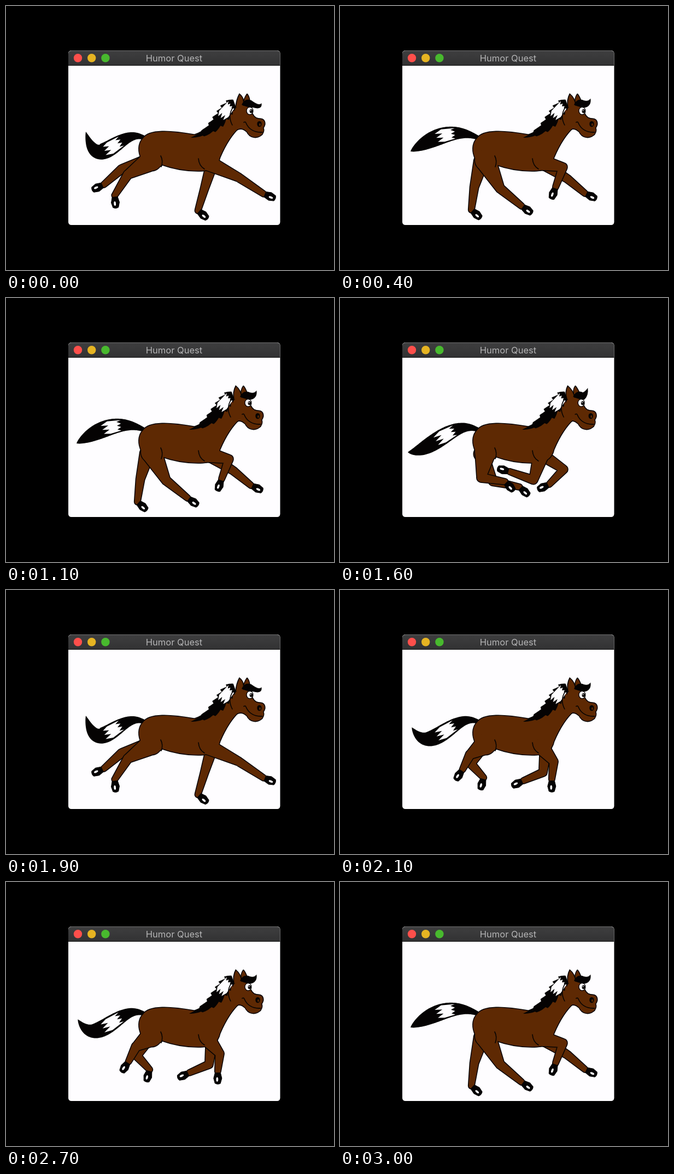
An HTML page with a canvas that plays this animation: 600 px wide and 481 px high, repeating every 3100 ms.

```html
<!DOCTYPE html>
<html lang="en">
<head>
<meta charset="utf-8">
<title>Galloping horse</title>
<style>
  html, body { margin: 0; width: 100%; height: 100%; overflow: hidden; background: #000; }
  canvas { display: block; }
</style>
</head>
<body>
<canvas id="stage" width="600" height="481"></canvas>
<script>
const ctx = document.getElementById('stage').getContext('2d');
const BROWN = '#5e2903', BLACK = '#050303', WHITE = '#fefdff';

// Five key moments of the stride: extend, plant, gather, land, reach.
// Each foot key holds the hoof centre, the hoof angle and the forward bend of the joint.
const hindNear = {
  hip: [266, 281], radii: [19, 8, 5],
  keys: [[200, 358, 85, -11], [170, 335, 162, 4], [311, 344, 46, -32], [343, 372, 35, -11], [275, 379, 40, -19]]
};
const hindFar = {
  hip: [258, 284], radii: [13, 7.5, 5],
  keys: [[167, 331, 155, -10], [220, 355, 137, -20], [338, 353, 42, -24], [250, 380, 42, -3], [185, 347, 160, 1]]
};
const foreNear = {
  hip: [368, 285], radii: [14, 7.5, 5],
  keys: [[483, 347, 22, 4], [432, 380, 38, 3], [298, 313, 195, 34], [390, 342, 110, 30], [445, 348, 60, 22]]
};
const foreFar = {
  hip: [376, 290], radii: [10, 7, 5],
  keys: [[361, 381, 40, 0], [300, 357, 155, 16], [371, 345, 155, 30], [460, 347, 25, 3], [425, 379, 38, 0]]
};
// Tip of the tail and the sag before it.
const tailKeys = [[146, 229, 315], [135, 235, 325], [124, 281, 282], [129, 265, 242], [124, 229, 282]];

const torso = new Path2D('M251 241C262 225 300 227 345 235C375 225 392 195 412 180L426 222C416 230 402 250 391 276C388 290 378 299 360 300C335 301 308 297 286 289C275 300 252 294 246 274C241 260 244 248 251 241Z');
const skull = new Path2D('M410 202C412 186 424 180 433 178L440 176C446 182 446 190 447 196C451 204 456 206 463 206C471 207 472 216 467 222C470 228 466 232 465 234C456 242 443 240 438 229C432 223 426 221 418 226Z');
const creases = new Path2D('M432 212q3 -2 4 1C440 223 450 231 466 230M412 185Q402 200 411 217');

const mix = (a, b, t) => a + (b - a) * t;

// The stride has seven steps; two of them lie between planting and gathering.
function sample(keys, step) {
  const k = step < 1 ? step : step < 4 ? 1 + (step - 1) / 3 : step - 2;
  const i = Math.floor(k), next = keys[(i + 1) % keys.length];
  return keys[i].map((v, n) => mix(v, next[n], k - i));
}

function fill(path, color) { ctx.fillStyle = color; ctx.fill(path); }

function line(path, width = 1.6) {
  ctx.strokeStyle = BLACK;
  ctx.lineWidth = width;
  ctx.stroke(path);
}

function oval(x, y, rx, ry, color) {
  const path = new Path2D();
  path.ellipse(x, y, rx, ry, 0, 0, 7);
  fill(path, color);
  return path;
}

function polygon(points) {
  const path = new Path2D();
  points.forEach(p => path.lineTo(...p));
  path.closePath();
  return path;
}

// Outlines the union of the shapes, leaving no lines inside it.
function flesh(...paths) {
  paths.forEach(p => line(p, 3));
  paths.forEach(p => fill(p, BROWN));
}

function poseLeg({ hip, radii, keys }, step) {
  const [x, y, degrees, bend] = sample(keys, step), angle = degrees * Math.PI / 180;
  const foot = [x - 13 * Math.cos(angle), y - 13 * Math.sin(angle)];
  const dx = foot[0] - hip[0], dy = foot[1] - hip[1], len = Math.hypot(dx, dy);
  const knee = [hip[0] + dx * .53 + dy / len * bend, hip[1] + dy * .53 - dx / len * bend];
  return { shape: limb([hip, knee, foot], radii), x, y, angle };
}

function limb(joints, radii) {
  const path = new Path2D();
  joints.forEach(([x, y], i) => {
    const r = radii[i];
    path.moveTo(x + r, y);
    path.arc(x, y, r, 0, 2 * Math.PI);
    if (i === joints.length - 1) return;
    const [u, v] = joints[i + 1], next = radii[i + 1];
    const len = Math.hypot(u - x, v - y), nx = (v - y) / len, ny = (x - u) / len;
    path.moveTo(x + nx * r, y + ny * r);
    path.lineTo(u + nx * next, v + ny * next);
    path.lineTo(u - nx * next, v - ny * next);
    path.lineTo(x - nx * r, y - ny * r);
    path.closePath();
  });
  return path;
}

function hoof({ x, y, angle }) {
  ctx.save();
  ctx.translate(x, y);
  ctx.rotate(angle);
  const path = new Path2D('M-10 -5L0 -7.5L9 -5Q12 0 9 5L0 7.5L-10 5Z');
  fill(path, BLACK);
  line(path, 1);
  oval(2, 1, 4, 1.9, WHITE);
  ctx.restore();
}

// Hair along a cubic spine, with a jagged white band from t = from to t = to.
function plume([a, b, c, d], width, from, to) {
  const bezier = (t, n) => (1 - t) ** 3 * a[n] + 3 * t * (1 - t) ** 2 * b[n] + 3 * t * t * (1 - t) * c[n] + t ** 3 * d[n];
  const at = (t, side) => {
    const x = bezier(t, 0), y = bezier(t, 1);
    const u = bezier(t + .01, 0) - x, v = bezier(t + .01, 1) - y;
    const w = side * width(t) / Math.hypot(u, v);
    return [x - v * w, y + u * w];
  };
  const top = [], bottom = [], front = [], back = [];
  for (let i = 0; i <= 60; i++) {
    top.push(at(i / 60, 1));
    bottom.unshift(at(i / 60, -1));
  }
  for (let i = 0; i <= 6; i++) {
    const side = .8 - i * .267, spike = i % 2 * .1;
    front.push(at(to - .1 + spike, side));
    back.unshift(at(from + spike * .6, side));
  }
  fill(polygon([...top, ...bottom]), BLACK);
  fill(polygon([...front, ...back]), WHITE);
}

function drawTail(step) {
  const [x, y, sag] = sample(tailKeys, step);
  plume([[252, 240], [207, 219], [168, sag], [x, y]],
    t => 4 * (1 - t) + 56 * t ** 1.3 * (1 - t) ** .85, .32, .6);
}

function drawHead(swing) {
  plume([[415, 177], [394, 184], [392, 226], [335, 240]],
    t => (9 + 14 * t * (1 - t)) * (1 - t ** 4) * (.75 + .45 * (t * 7 % 1)), .1, .48);
  line(creases);
  const tip = 421 + 3 * swing;
  flesh(new Path2D(`M431 179Q${tip + 9} 168 ${tip + 14} 161Q${tip + 20} 169 441 178`));
  const ear = new Path2D(`M417 185Q${tip - 6} 171 ${tip} 160Q${tip + 10} 168 431 181`);
  fill(ear, BROWN);
  line(ear);
  line(oval(443, 191, 6, 6.8, WHITE), 1.3);
  oval(445.5, 191.5, 2.9, 3.5, BLACK);
  oval(444.7, 190.5, .9, .9, WHITE);
  oval(460.5, 215, 4.2, 5.2, BLACK);
  oval(461.5, 216, 1.4, 2.5, BROWN);
  const x = 459.5 + 5 * swing, y = 170 + 7 * swing;
  fill(new Path2D(`M428 180Q434 167 446 172Q${x - 4} ${y + 6} ${x} ${y}Q${x + 2} ${y + 13} 449 185Q438 185 428 180Z`), BLACK);
}

function drawHorse(step) {
  const [backFar, backNear, frontFar, frontNear] =
    [hindFar, hindNear, foreFar, foreNear].map(leg => poseLeg(leg, step));
  const swing = Math.cos(step * 2 * Math.PI / 7), nod = .5 + 2.5 * swing;
  const head = new Path2D();
  head.addPath(skull, { e: nod });

  drawTail(step);
  flesh(backFar.shape);
  flesh(frontFar.shape);
  hoof(backFar);
  hoof(frontFar);
  flesh(torso, head, backNear.shape, frontNear.shape);
  hoof(backNear);
  hoof(frontNear);
  line(new Path2D('M283 273Q288 282 284 293M352 278Q353 291 363 297'));
  ctx.save();
  ctx.translate(nod, 0);
  drawHead(swing);
  ctx.restore();
}

function drawWindow() {
  ctx.fillStyle = '#000';
  ctx.fillRect(0, 0, 600, 481);
  const frame = new Path2D();
  frame.roundRect(114, 81, 387.5, 318, 5.5);
  fill(frame, WHITE);
  const bar = new Path2D();
  bar.roundRect(114, 81, 387.5, 27.5, [5.5, 5.5, 0, 0]);
  const shade = ctx.createLinearGradient(0, 81, 0, 108);
  shade.addColorStop(0, '#3e3e3f');
  shade.addColorStop(1, '#323233');
  fill(bar, '#707071');
  ctx.save();
  ctx.clip(bar);
  ctx.translate(0, 1);
  fill(bar, shade);
  ctx.restore();
  ctx.fillStyle = '#151515';
  ctx.fillRect(114, 107.5, 387.5, 1);
  ['#fe4f4b', '#e6b422', '#48b92e'].forEach((c, i) => oval(131.5 + 25.2 * i, 94.7, 7.7, 7.7, c));
  ctx.fillStyle = '#b5b5b6';
  ctx.font = '16.5px Inter, Roboto, sans-serif';
  ctx.textAlign = 'center';
  ctx.fillText('Humor Quest', 307.5, 101);
}

function render() {
  const tick = Math.floor(performance.now() % 3100 / 100);
  drawWindow();
  // Three strides take nineteen ticks.
  drawHorse(Math.floor((tick * 3 / 19 + .097) * 7) % 7);
  requestAnimationFrame(render);
}

ctx.lineJoin = ctx.lineCap = 'round';
render();
</script>
</body>
</html>
```
